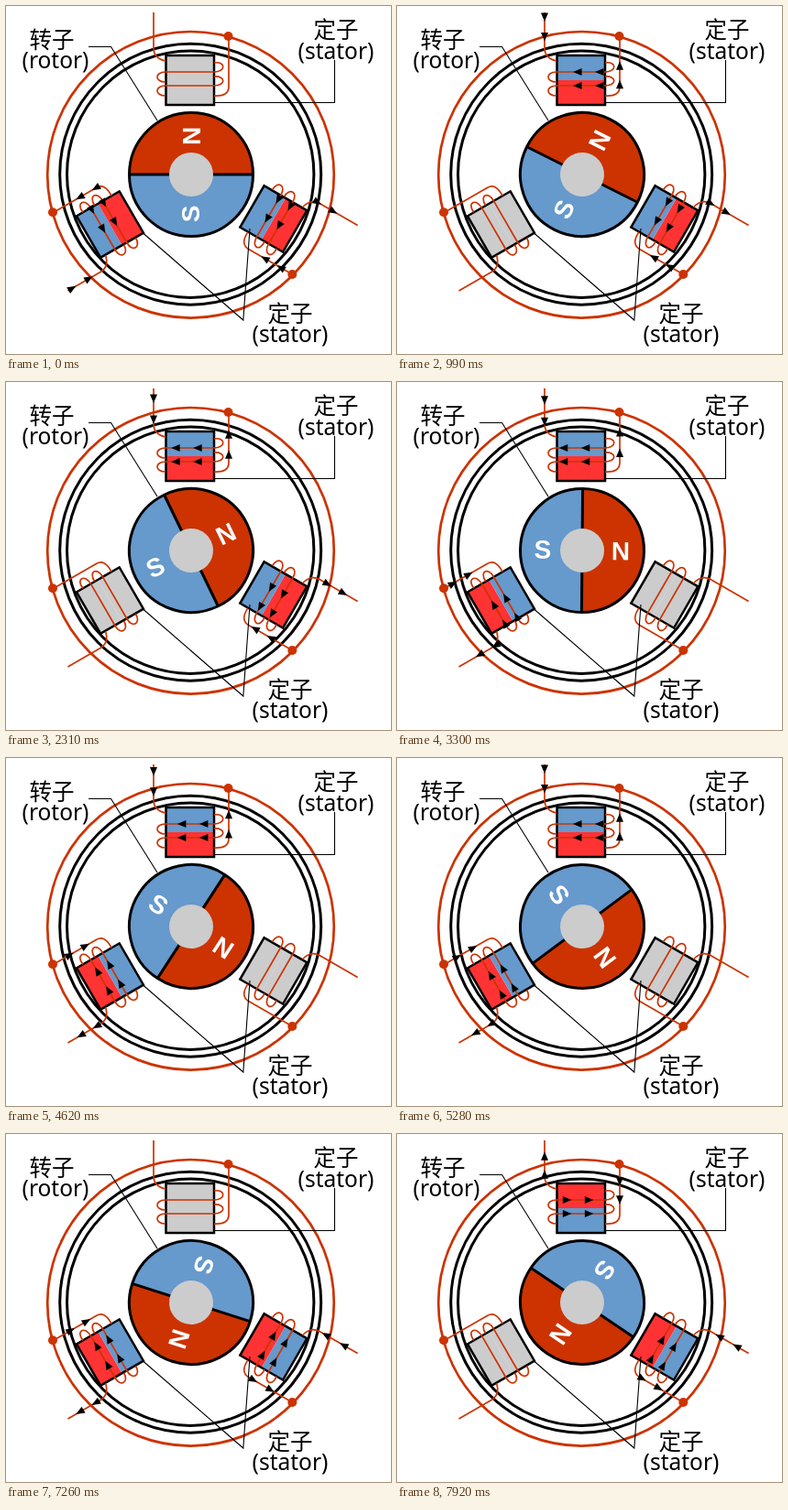
Recreate the animation shown at these times as an HTML page. Size 420x380 px, loop 8 s.

```html
<!DOCTYPE html>
<html lang="zh">
<head>
<meta charset="utf-8">
<style>
  html, body { margin: 0; width: 100%; height: 100%; overflow: hidden; background: #fff; }
  svg { display: block; width: 420px; height: 380px; }
  .label { font: 24.5px "Noto Sans", "Open Sans", "Noto Sans CJK SC", sans-serif; text-anchor: middle; }
  .cjk { font-family: "Noto Sans CJK SC", "Noto Sans CJK", sans-serif; }
  .pole { font: bold 28px "Liberation Sans", sans-serif; text-anchor: middle; fill: #fff; }
  .wire { fill: none; stroke: #c30; stroke-width: 1.7; }
  .bus { fill: none; stroke: #c30; stroke-width: 2.7; }
  .ring { fill: none; stroke: #000; stroke-width: 3; }
  .leader { fill: none; stroke: #000; stroke-width: 1.1; }
</style>
</head>
<body>
<svg viewBox="0 0 420 380">
  <circle class="bus" cx="201.5" cy="184.3" r="156.3"/>
  <circle class="ring" cx="201.2" cy="183.7" r="142.5"/>
  <circle class="ring" cx="201.2" cy="183.7" r="134.7"/>
  <g id="stators"></g>
  <g fill="#c30">
    <circle cx="242.5" cy="33" r="5"/>
    <circle cx="51" cy="225.3" r="5"/>
    <circle cx="312.3" cy="293" r="5"/>
  </g>
  <g id="rotor">
    <path d="M-67.5 0A67.5 67.5 0 0 1 67.5 0Z" fill="#c30"/>
    <path d="M-67.5 0A67.5 67.5 0 0 0 67.5 0Z" fill="#69c"/>
    <circle class="ring" r="67.5"/>
    <path class="ring" d="M-67.5 0H67.5"/>
    <circle r="24" fill="#ccc"/>
    <text class="pole" transform="translate(0 -42) rotate(-90)" y="10">N</text>
    <text class="pole" transform="translate(-1 43) rotate(-90)" y="10">S</text>
  </g>
  <path class="leader" d="M90 44.5H114.5L165 125M358.5 59V105.5H227M149.5 248L258.8 343L266 243"/>
  <text class="label cjk" x="50" y="46">转子</text>
  <text class="label" x="54" y="68">(rotor)</text>
  <text class="label cjk" x="360" y="34.5">定子</text>
  <text class="label" x="360" y="57.5">(stator)</text>
  <text class="label cjk" x="310" y="345">定子</text>
  <text class="label" x="310" y="367">(stator)</text>
</svg>
<script>
const LOOP = 8000, STEP = 330;
const BLUE = '#69c', RED = '#f33', GREY = '#ccc';

// Top, left and right coil: rotation, vertical offset, start of the lead wire
const COILS = [
  { angle: 0, shift: 0, leadTop: 7 },
  { angle: -120, shift: 2, leadTop: 5 },
  { angle: 120, shift: -2, leadTop: -2 }
];

// [step, rotor angle]
const TURNS = [[0, 0], [3, 26.6], [7, 64.2], [10, 90.5], [14, 123], [19, 173.6], [24, 214]];

// [first step, current in the top, left and right coil]
const PHASES = [[0, 0, 1, -1], [3, 1, 0, -1], [10, 1, -1, 0], [17, 0, -1, 1], [23, -1, 0, 1]];

const stators = COILS.map(({ angle, shift, leadTop }) => {
  const group = document.createElementNS('http://www.w3.org/2000/svg', 'g');
  group.setAttribute('transform', `translate(0 ${shift}) rotate(${angle} 202 184)`);
  group.innerHTML = `
    <rect class="outer" x="174.5" y="54" width="52.5" height="27"/>
    <rect class="inner" x="174.5" y="81" width="52.5" height="27"/>
    <rect x="174.5" y="54" width="52.5" height="54" fill="none" stroke="#000" stroke-width="2.5"/>
    <path class="wire" d="M161 ${leadTop}V46Q161 57 174 60
      M227 62C240 60 240 72 227 72H174C162 72 162 83 174 83
      M227 77C240 76 240 87 227 87H174C162 87 162 98 174 98
      M227 98Q243 99 243 88V33"/>
    <g class="arrows">${'<path d="M-5 0L4.5 -4V4Z"/>'.repeat(8)}</g>`;
  document.getElementById('stators').append(group);
  const arrows = group.querySelector('.arrows');
  return {
    outer: group.querySelector('.outer'),
    inner: group.querySelector('.inner'),
    arrows, heads: [...arrows.children]
  };
});

const rotor = document.getElementById('rotor');
const fraction = x => x - Math.floor(x);

function rotorAngle(step) {
  const i = Math.max(1, TURNS.findIndex(turn => turn[0] >= step));
  const [s0, a0] = TURNS[i - 1], [s1, a1] = TURNS[i];
  return a0 + (a1 - a0) * (step - s0) / (s1 - s0);
}

// Arrow places as [x, y, heading] along lead, windings and return wire
function arrowPlaces(step, current) {
  const flow = (step - 3) * 0.385;
  const forward = current > 0;
  const q = fraction(flow - (forward ? 0.82 : 0.66));
  const x = forward ? 201 - 22 * q : 176 + 22 * q;
  const lead = forward ? [10 + 11 * q, 31 + 14 * q] : [32 - 18 * q, 52 - 18 * q];
  const back = forward ? [68 - 15 * q, 88 - 12 * q] : [44 + 18 * q, 64 + 18 * q];
  const turn = forward ? 0 : 180;
  return [
    ...lead.map(y => [161, y, 270 + turn]),
    ...[72, 87].flatMap(y => [[x, y, turn], [x + 24, y, turn]]),
    ...back.map(y => [243, y, 90 + turn])
  ];
}

function drawStator(stator, current, step) {
  const colours = current > 0 ? [BLUE, RED] : current < 0 ? [RED, BLUE] : [GREY, GREY];
  stator.outer.setAttribute('fill', colours[0]);
  stator.inner.setAttribute('fill', colours[1]);
  stator.arrows.style.display = current ? '' : 'none';
  if (!current) return;
  arrowPlaces(step, current).forEach(([x, y, heading], i) =>
    stator.heads[i].setAttribute('transform', `translate(${x} ${y}) rotate(${heading})`));
}

function draw(time) {
  const step = Math.floor(time % LOOP / STEP);
  const currents = PHASES.filter(phase => phase[0] <= step).pop().slice(1);
  rotor.setAttribute('transform', `translate(202 184) rotate(${rotorAngle(step)})`);
  stators.forEach((stator, i) => drawStator(stator, currents[i], step));
}

const start = performance.now();
function tick() {
  draw(performance.now() - start);
  requestAnimationFrame(tick);
}
tick();
</script>
</body>
</html>
```
